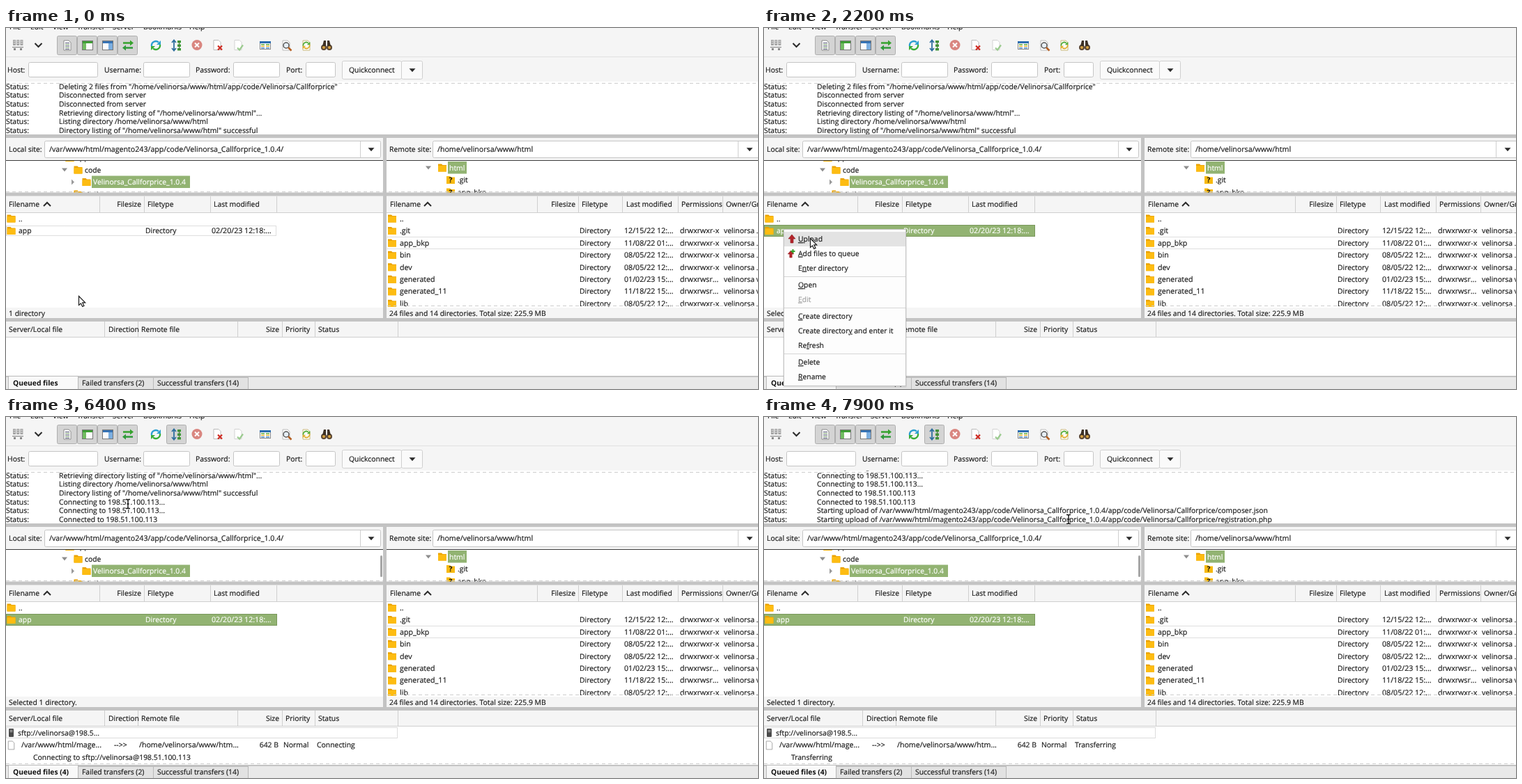
An HTML page for the animation above (8 s loop, 1079 by 519 pixels).

```html
<!DOCTYPE html>
<html lang="en">
<head>
<meta charset="utf-8">
<title>File transfer</title>
<style>
html, body { margin: 0; width: 100%; height: 100%; overflow: hidden; background: #f5f5f5; }
svg { display: block; width: 100vw; height: 100vh; }
text { font-family: "Open Sans", "Noto Sans", sans-serif; font-size: 10.4px; color: #1c1c1c; fill: currentColor; stroke: currentColor; stroke-width: .18px; white-space: pre; text-rendering: geometricPrecision; }
.wide { font-size: 10.65px; }
.bold { font-weight: 700; font-size: 10.3px; color: #111; stroke: none; }
.sel { color: #fff; }
.off { color: #a2a2a2; }
.u { text-decoration: underline; }
</style>
</head>
<body>
<svg id="stage" viewBox="0 0 1079 519"></svg>
<script>
const LOOP = 8000, LINE = 12.65, ROW = 17.45;
const BG = '#f5f5f5', EDGE = '#cfcfcf', BAR = '#c3c3c3', GREEN = '#92b372', INK = '#2a2a2a';
const USER = 'velinorsa', VENDOR = 'Velinorsa', HOST = '198.51.100.113';
const HOME = `/home/${USER}/www/html`;
const MODULE = `${VENDOR}_Callforprice_1.0.4`;
const LOCAL = `/var/www/html/magento243/app/code/${MODULE}/`;
const UPLOAD = `Starting upload of ${LOCAL}app/code/${VENDOR}/Callforprice/`;

// Drawing helpers; text is placed by its vertical centre.
const text = (x, y, s, cls = '', anchor = 'start') =>
  `<text x="${x}" y="${y + 3.7}" class="${cls}" text-anchor="${anchor}">${s}</text>`;
const rect = (x, y, w, h, fill, extra = '') =>
  `<rect x="${x}" y="${y}" width="${w}" height="${h}" fill="${fill}" ${extra}/>`;
const box = (x, y, w, h, fill, stroke = EDGE, r = 0, extra = '') =>
  rect(x + .5, y + .5, w - 1, h - 1, fill, `stroke="${stroke}" rx="${r}" ${extra}`);
const path = (d, fill, stroke = 'none', w = 1, extra = '') =>
  `<path d="${d}" fill="${fill}" stroke="${stroke}" stroke-width="${w}" ${extra}/>`;
const circle = (x, y, r, fill, extra = '') => `<circle cx="${x}" cy="${y}" r="${r}" fill="${fill}" ${extra}/>`;
const group = (id, body, extra = '') => `<g id="${id}" ${extra}>${body}</g>`;
const at = (x, y, body, scale = 1) => `<g transform="translate(${x} ${y}) scale(${scale})">${body}</g>`;
const clip = (id, x, y, w, h) => `<clipPath id="${id}">${rect(x, y, w, h, '#000')}</clipPath>`;
const dashes = (x, y, w, color = '#cdcdcd', dash = '5 4') =>
  path(`M${x} ${y}h${w}`, 'none', color, 1, `stroke-dasharray="${dash}"`);
const vline = (x, y, h) => rect(x, y, 1, h, EDGE);

const folderBack = path('M-6 -5.5h5l1.5 1.5h5.5v9.5h-12z', '#e9a100');
const folder = (x, y) => at(x, y, folderBack + rect(-6, -3.2, 12, 8.7, '#fdbc12', 'rx=".8"'));
const unknown = (x, y) => at(x, y, path('M-6 -5.5h5l1.5 1.5h5.5v9.5h-12z', '#f7b90f') + text(0, 0, '?', 'bold', 'middle'));
const page = (stroke = '#8c8c8c') => path('M-5 -7h7l3 3v11h-10z', '#fff', stroke);
const chevron = (x, y, dir = 1) => path(`M${x - 5} ${y - 2.5 * dir}l5 ${5 * dir}l5 ${-5 * dir}`, 'none', INK, 2);
const caret = (x, y) => path(`M${x - 4.5} ${y - 2.3}h9l-4.5 5z`, INK);
const opener = (x, y) => path(`M${x - 4} ${y - 2.5}h8l-4 5z`, '#8d8d8d');
const closed = (x, y) => path(`M${x - 2} ${y - 4}v8l4 -4z`, '#9a9a9a');

function icons() {
  const win = color => box(-8, -7, 16, 14, '#fdfdfd', '#777') + rect(-7, -6, 14, 3, color);
  const spin = (a, b) => path('M-6 1a6 6 0 0 1 10 -5.3', 'none', a, 2.3) + path('M7 -7v6h-6z', a) +
    path('M6 -1a6 6 0 0 1 -10 5.3', 'none', b, 2.3) + path('M-7 7v-6h6z', b);
  let servers = '';
  for (let i = 0; i < 3; i++) servers += rect(-7 + i * 5.2, -7, 4, 8, '#a2a2a2') +
    rect(-6.2 + i * 5.2, -5.5, 2.4, 1, '#eee') + rect(-6.2 + i * 5.2, -2.5, 2.4, 1, '#eee');
  servers += rect(-8, 3, 16, 1.2, '#8a8a8a') + rect(-6, 5, 3, 3, '#8a8a8a') + rect(3, 5, 3, 3, '#8a8a8a');
  let lines = '';
  for (let i = 0; i < 5; i++) lines += rect(-3, -4 + i * 2.2, 6, 1, i % 2 ? '#79a06b' : '#557');
  let list = box(-8, -6, 16, 12, '#fff', '#888') + rect(-8, -6, 16, 3, '#2b6cb0');
  ['#61b045', '#e7b53b', '#4f89c7'].forEach((c, i) => list += rect(-6, -2 + i * 2.5, 5, 1.5, c) + rect(1, -2 + i * 2.5, 5, 1.5, c));
  const process = path('M-4 -7v14M-7 -4l3 -3.5l3 3.5M-7 4l3 3.5l3 -3.5', 'none', '#2f6f9f', 1.8) +
    [-7, -1.5, 4].map(y => rect(1, y, 5, 3.4, '#3d9a36')).join('') + rect(3, -7, 1.2, 14, '#4d7b3f');
  return at(17, 24, servers) + chevron(46.5, 24.5) +
    at(88, 25, page() + lines) +
    at(117, 25, win('#3f9f36') + rect(-7, -3, 5, 9, '#72bc62')) +
    at(146, 25, win('#3673b5') + rect(1, -3, 6, 9, '#7baee0')) +
    at(175, 25, path('M8 -3.5l-5 -4v2.7h-10v2.6h10v2.7z', '#35a22c') + path('M-8 3.5l5 -4v2.7h10v2.6h-10v2.7z', '#2f9a3a')) +
    at(215, 25, spin('#2c9fd0', '#37ad35')) +
    at(245, 25, process) +
    at(274, 24.5, circle(0, 0, 7.5, '#d98680') + path('M-3 -3l6 6M3 -3l-6 6', 'none', '#fff', 2)) +
    at(303, 24.5, page('#bbb') + path('M1 1l6 6M7 1l-6 6', 'none', '#cf2a22', 2.2)) +
    at(333, 24.5, page('#d2d2d2') + path('M-1 4l3 3l5 -7', 'none', '#9bcb8f', 2.2)) +
    at(372, 25, list) +
    at(402, 25, page('#bbb') + circle(0, 0, 4, '#e6eef5', 'stroke="#555" stroke-width="1.5"') + path('M3 3l4.5 4.5', 'none', '#b45f22', 2.5)) +
    at(431, 25, page('#c9b97a') + at(0, 0, spin('#55ad3b', '#e0ad2d'), .75)) +
    at(460, 25, circle(-4, 3, 4, '#5b4632') + circle(4, 3, 4, '#5b4632') + path('M-6 1l2 -8h3v8zM6 1l-2 -8h-3v8z', '#3c3025') +
      circle(-4, 3, 2, '#d8a542') + circle(4, 3, 2, '#d8a542'));
}

function header() {
  let s = rect(0, 0, 1079, 77, BG);
  [[5, 'File'], [35, 'Edit'], [67, 'View'], [102, 'Transfer'], [153, 'Server'], [197, 'Bookmarks'], [263, 'Help']]
    .forEach(([x, name]) => s += text(x, -2, name));
  const pressed = x => box(x, 11, 29, 28, '#d4d4d4', '#aeaeae', 2);
  s += [73, 102, 131, 160].map(pressed).join('') + group('process', pressed(230)) + icons();
  s += rect(0, 41, 1079, 1, '#e0e0e0');
  [[2, 'Host:', 32, 100], [141, 'Username:', 197, 67], [272, 'Password:', 326, 67], [402, 'Port:', 430, 43]]
    .forEach(([x, name, bx, w]) => s += text(x, 60.5, name) + box(bx, 49, w, 22, '#fff', '#c5c5c5', 2));
  return s + box(482, 47, 86, 27, '#fafafa', EDGE, 2) + text(492, 60.5, 'Quickconnect') +
    box(567, 47, 31, 27, '#fafafa', EDGE, 2) + caret(583, 60.5);
}

function log() {
  const lines = [
    `Deleting 2 files from "${HOME}/app/code/${VENDOR}/Callforprice"`,
    'Disconnected from server', 'Disconnected from server',
    `Retrieving directory listing of "${HOME}"...`, `Listing directory ${HOME}`,
    `Directory listing of "${HOME}" successful`,
    `Connecting to ${HOST}...`, `Connecting to ${HOST}...`,
    `Connected to ${HOST}`, `Connected to ${HOST}`,
    UPLOAD + 'composer.json', UPLOAD + 'registration.php'
  ];
  const body = lines.map((s, i) => text(0, 84 + i * LINE, 'Status:') + text(76, 84 + i * LINE, s)).join('');
  return rect(0, 77, 1079, 77, '#fff') + `<g clip-path="url(#logClip)">${group('log', body)}</g>` + dashes(0, 79.5, 1079);
}

function sites() {
  const field = (x, w, label, lx, value) => text(lx, 174, label) + box(x, 162, w, 25, '#fff', '#c5c5c5', 2) + text(x + 7, 174, value, 'wide');
  let s = field(55, 483, 'Local site:', 4, LOCAL) + vline(508, 163, 23) + caret(524, 174.5) +
    field(612, 474, 'Remote site:', 550, HOME) + vline(1050, 163, 23) + caret(1067, 174.5);
  s += rect(0, 190, 1079, 47, '#fff');
  const local = folder(91.5, 186.5) + text(100, 186.5, 'app') +
    opener(84, 204) + folder(103.5, 204) + text(113, 204, 'code') +
    rect(123, 212.5, 141, 17.5, GREEN) + closed(96, 221.5) + folder(115.5, 221.5) + text(125, 221.5, MODULE, 'sel') +
    folder(103.5, 239) + text(113, 239, 'design');
  const remote = opener(606, 201) + folder(626, 201) + rect(634, 192, 27, 17.5, GREEN) + text(636, 201, 'html', 'sel') +
    unknown(638, 218.5) + text(648, 218.5, '.git') + unknown(638, 236) + text(648, 236, 'app_bkp');
  return s + `<g clip-path="url(#treeClip)">${local + remote}</g>` + rect(0, 190, 1079, 1, '#3a3a3a') +
    dashes(0, 235.5, 1079) + group('thumb', rect(537, 199, 3, 31, '#a6a6a6', 'rx="1.5"'));
}

function lists() {
  let s = rect(0, 242, 1079, 24, BG) + rect(0, 265, 1079, 1, EDGE) + rect(0, 266, 1079, 136, '#fff');
  [134, 198, 293, 388, 762, 821, 884, 964, 1028].forEach(x => s += vline(x, 242, 23));
  [[4, 'Filename'], [203, 'Filetype'], [298, 'Last modified'], [551, 'Filename'], [826, 'Filetype'],
    [890, 'Last modified'], [969, 'Permissions'], [1033, 'Owner/Group']].forEach(([x, name]) => s += text(x, 253.5, name));
  s += text(194, 253.5, 'Filesize', '', 'end') + text(817, 253.5, 'Filesize', '', 'end') + chevron(59, 253.5, -1) + chevron(605, 253.5, -1);

  const entry = cls => text(18, 291.5, 'app', cls) + text(200, 291.5, 'Directory', cls) + text(295, 291.5, '02/20/23 12:18:...', 'wide ' + cls);
  s += folder(7.5, 274) + text(18, 274, '..') +
    group('plain', box(0, 284, 388, 15, 'none', '#bdbdbd', 0, 'stroke-dasharray="1 1"') + entry('')) +
    group('picked', rect(0, 283, 389, 17, GREEN) + box(0, 283, 389, 17, 'none', '#5e7a43', 0, 'stroke-dasharray="1 1"') + entry('sel')) +
    folder(7.5, 291.5);

  const rows = [['..'], ['.git', '12/15/22 12'], ['app_bkp', '11/08/22 01'], ['bin', '08/05/22 12'], ['dev', '08/05/22 12'],
    ['generated', '01/02/23 15', 1], ['generated_11', '11/18/22 15', 1], ['lib', '08/05/22 12']];
  const remote = rows.map(([name, date, shared], i) => {
    const y = 274 + i * ROW;
    let r = folder(554, y) + text(565, y, name, 'wide');
    if (date) r += text(823, y, 'Directory') + text(887, y, date + ':...', 'wide') +
      text(967, y, shared ? 'drwxrwsr...' : 'drwxrwxr-x', 'wide') + text(1030, y, `${USER} ${shared ? USER : '...'}`);
    return r;
  }).join('');
  s += `<g clip-path="url(#listClip)">${remote}</g>` + dashes(547, 300.5, 532, '#bdbdbd', '1 1') +
    dashes(547, 317.5, 532, '#bdbdbd', '1 1') + dashes(547, 399.5, 532);
  return s + rect(0, 402, 1079, 16, BG) + group('idle', text(4, 410, '1 directory')) +
    group('chosen', text(4, 410, 'Selected 1 directory.')) +
    text(550, 410, '24 files and 14 directories. Total size: 225.9 MB');
}

function queue() {
  let s = rect(0, 422, 1079, 23, BG) + rect(0, 444, 1079, 1, EDGE) + rect(0, 445, 1079, 56, '#fff');
  [141, 189, 332, 396, 443, 562].forEach(x => s += vline(x, 422, 22));
  [[4, 'Server/Local file'], [147, 'Direction'], [194, 'Remote file'], [401, 'Priority'], [448, 'Status']]
    .forEach(([x, name]) => s += text(x, 433.5, name));
  s += text(392, 433.5, 'Size', '', 'end');
  const items = box(0, 446, 562, 16, 'none', '#dcdcdc') +
    rect(4, 448, 7, 12, '#4b4b4b', 'rx="1"') + rect(5.5, 450, 4, 1, '#bbb') + rect(5.5, 452, 4, 1, '#bbb') +
    text(17, 454, `sftp://${USER}@${HOST.slice(0, 5)}...`) +
    at(7.5, 472, page('#999'), .85) +
    text(22, 471.5, '/var/www/html/mage...', 'wide') + text(155, 471.5, '--&gt;&gt;') +
    text(191, 471.5, HOME.slice(0, -1) + '...', 'wide') + text(391, 471.5, '642 B', '', 'end') + text(398, 471.5, 'Normal') +
    group('waiting', text(446, 471.5, 'Connecting') + text(39, 489, `Connecting to sftp://${USER}@${HOST}`)) +
    group('sending', text(446, 471.5, 'Transferring') + text(39, 489, 'Transferring')) + dashes(0, 498.5, 1079);
  s += group('items', items);
  s += rect(0, 500, 1079, 19, '#e9e9e9') + rect(0, 500, 1079, 2, BAR) + box(103, 502, 109, 20, '#e2e2e2', '#b9b9b9') +
    box(211, 502, 137, 20, '#e2e2e2', '#b9b9b9') + box(3, 500, 101, 22, '#f9f9f9', '#b9b9b9');
  return s + group('none', text(10, 510, 'Queued files', 'bold')) + group('four', text(10, 510, 'Queued files (4)', 'bold')) +
    text(109, 510, 'Failed transfers (2)') + text(217, 510, 'Successful transfers (14)');
}

function menu() {
  const items = [[303.5, '_Upload'], [324, '_Add files to queue'], [345, 'E_nter directory'], [369.5, '_Open'], [390, '_Edit', 'off'],
    [414.5, '_Create directory'], [435, 'Create director_y and enter it'], [456, 'Re_fresh'], [480.5, '_Delete'], [501, '_Rename']];
  const arrow = path('M0 -6l5 6h-3v6h-4v-6h-3z', '#b3242a', '#8c161b', .6);
  return rect(27, 290, 178, 227, 'rgba(0,0,0,.07)', 'rx="2"') + box(28, 289, 176, 226, '#fdfdfd', '#c4c4c4') +
    group('hover', rect(29, 293, 174, 21, '#e3e3e3')) +
    [357, 402, 468].map(y => rect(29, y, 174, 1, '#d6d6d6')).join('') +
    at(40, 303, arrow) + at(38.5, 325, arrow, .85) +
    path('M41.5 318v6M38.5 321h6', 'none', '#35a22c', 2) +
    items.map(([y, s, cls]) => text(49, y, s.replace(/_(.)/, '<tspan class="u">$1</tspan>'), cls)).join('');
}

const bars = rect(0, 153, 1079, 5, BAR) + rect(0, 236.5, 1079, 5, BAR) + rect(0, 417, 1079, 5, BAR) + rect(541, 157, 5, 261, BAR);
const beam = 'M-3 -6.5h2l1 1l1 -1h2M0 -5.5v11M-3 6.5h2l1 -1l1 1h2M-1.5 0h3';
const pointers = group('arrow', path('M.5 .5v13l3 -2.6l2.2 4.6l2.3 -1.1l-2.2 -4.5h3.9z', '#fff', '#1a1a1a', 1.2)) +
  group('beam', path(beam, 'none', '#fff', 3) + path(beam, 'none', '#111', 1.4));

document.getElementById('stage').innerHTML =
  `<defs>${clip('logClip', 0, 77, 1079, 76) + clip('treeClip', 0, 190, 1079, 47) + clip('listClip', 546, 266, 533, 135)}</defs>` +
  rect(0, 0, 1079, 519, BG) + header() + log() + sites() + lists() + queue() + bars +
  group('menu', menu()) + group('pointer', pointers);

// Pointer stops: time, x, y.
const stops = [
  [0, 104, 385], [200, 109, 376], [300, 112, 352], [400, 105, 321], [500, 90, 290], [600, 72, 266], [700, 55, 254],
  [800, 40, 263], [900, 30, 281], [1000, 26, 291], [1100, 25, 289],
  [1900, 38, 283], [2000, 52, 291], [2100, 63, 299], [2200, 66, 302],
  [4400, 90, 310], [4500, 140, 326], [4600, 175, 336], [5500, 181, 337],
  [5700, 190, 330], [5800, 221, 279], [6000, 218, 195], [6200, 205, 162], [6300, 188, 138], [6400, 175, 125], [6500, 171, 122],
  [7200, 178, 122], [7300, 196, 123], [7500, 224, 125], [7700, 300, 133], [7800, 388, 143], [7900, 437, 147]
];
const scrolls = [[0, 0], [3500, 2], [6200, 3], [6500, 4], [7000, 5], [7300, 6]];
const latest = (keys, t) => keys.filter(k => k[0] <= t).pop();
const el = id => document.getElementById(id);
const show = (id, on) => el(id).setAttribute('visibility', on ? 'visible' : 'hidden');
const either = (before, after, on) => { show(before, !on); show(after, on); };

function draw(t) {
  const queued = t >= 3500;
  either('plain', 'picked', t >= 1300);
  either('idle', 'chosen', t >= 1300);
  show('menu', t >= 1700 && !queued);
  show('hover', t >= 1900 && !queued);
  show('process', queued);
  show('items', queued);
  either('none', 'four', queued);
  show('waiting', queued && t < 7000);
  show('sending', t >= 7000);
  show('thumb', t >= 6200);
  el('log').setAttribute('transform', `translate(0 ${-LINE * latest(scrolls, t)[1]})`);
  const [, x, y] = latest(stops, t);
  el('pointer').setAttribute('transform', `translate(${x} ${y})`);
  either('arrow', 'beam', y > 78 && y < 153);
}

const start = performance.now();
function tick() {
  draw((performance.now() - start) % LOOP);
  requestAnimationFrame(tick);
}
tick();
</script>
</body>
</html>
```
